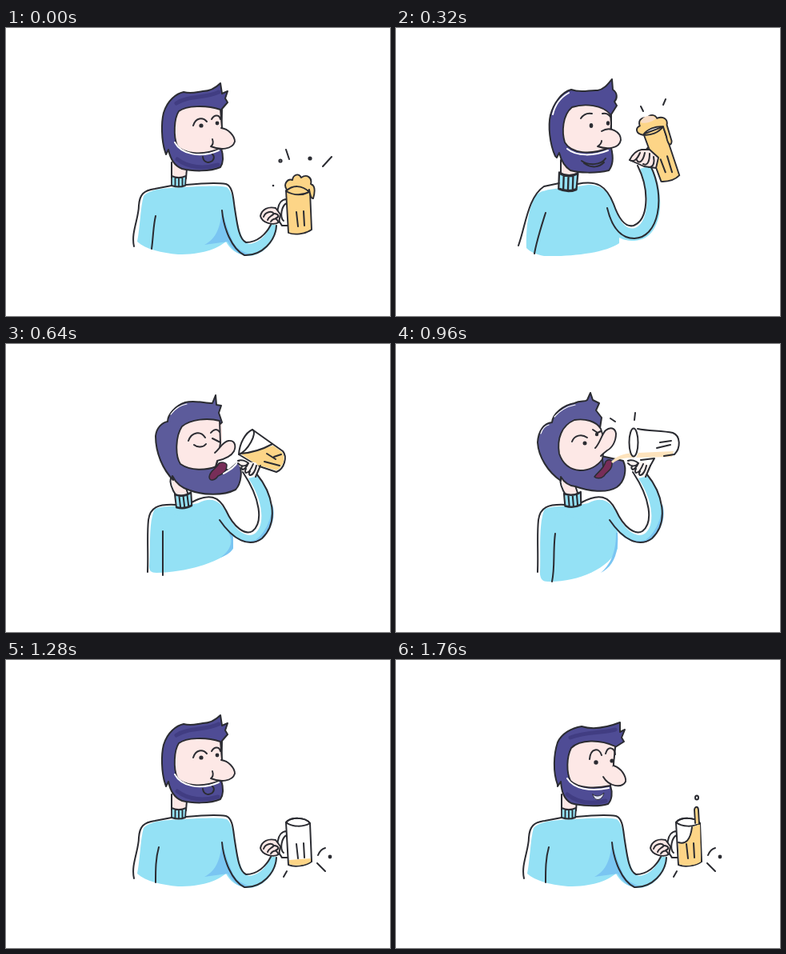
Animation, 480 px wide and 360 px high, one loop 1.92 s. Source, as an HTML page without scripts:

```html
<!DOCTYPE html>
<html lang="en">
<head>
<meta charset="utf-8">
<title>Cheers</title>
<style>
html, body { margin: 0; width: 100%; height: 100%; overflow: hidden; background: #fff; }
.stage { position: relative; width: 480px; height: 360px; overflow: hidden; }
.strip { display: block; width: 5760px; height: 360px; animation: flip 1.92s steps(12) -1ms infinite; }
@keyframes flip { to { transform: translateX(-5760px); } }
path, circle, ellipse { stroke-linecap: round; stroke-linejoin: round; }
.l { fill: none; stroke: #2b2c32; stroke-width: 2; }
.hair { fill: #4f4c95; stroke: #2b2c32; stroke-width: 2; }
.pale { fill: #5c5b9b; }
.dark { fill: none; stroke: #413d82; stroke-width: 5; }
.skin { fill: #fde8e6; stroke: #2b2c32; stroke-width: 1.9; }
.plain { fill: #fde8e6; }
.rim { fill: none; stroke: #fff; stroke-width: 2; }
.knit { fill: #94e1f5; }
.shade { fill: #7ac5f2; }
.beer { fill: #fdd587; }
.foam { fill: #fde3bd; }
.gold { fill: #fdd587; stroke: #2b2c32; stroke-width: 1.9; }
.glass { fill: #fff; stroke: #2b2c32; stroke-width: 2; }
.dot { fill: #2b2c32; }
.mouth { fill: #772d58; stroke: #2b2c32; stroke-width: 1.5; }
</style>
</head>
<body>
<div class="stage">
<svg class="strip" viewBox="0 0 5760 360">
<defs>
  <g id="collar">
    <path class="knit" d="M1 1Q10 4 19 1L19 12Q10 15 1 12Z"/>
    <path class="l" d="M0 0Q10 4 20 0M0 0L0 12Q10 15 19 12L20 0M5 2L5 12M10 3L10 13M15 2L15 12"/>
  </g>

  <!-- bodies -->
  <g id="bodyRest">
    <path class="plain" d="M207 165H226V190H207Z"/>
    <path class="l" d="M207 168V187M226 176L225 188"/>
    <path class="knit" d="M172 210C180 201 200 200 220 199C245 198 262 196 276 199C284 205 285 222 288 236C292 256 296 268 304 270C318 268 326 258 331 246L339 246C338 266 322 284 304 285C288 284 279 275 275 267C262 277 245 283 215 283C195 281 175 277 164 267C168 245 168 225 172 210Z"/>
    <path class="shade" d="M270 228C268 250 262 264 248 271L277 267C286 282 296 286 308 284C296 280 288 276 284 268C278 254 273 240 270 228Z"/>
    <path class="l" d="M160 273C156 256 166 238 166 222C167 208 172 203 186 201L207 197M225 196C245 194 264 193 275 195C284 198 284 214 286 226C289 245 291 264 300 268C314 268 325 258 331 246M270 228C272 250 282 276 298 284C320 285 337 266 338 247"/>
    <use href="#collar" transform="translate(207 185) scale(.9 1)"/>
  </g>
  <g id="bodyLift">
    <path class="plain" d="M205 160H227V186H204Z"/>
    <path class="l" d="M204 162V184M227 176V184"/>
    <path class="knit" d="M176 207C185 200 215 200 240 197C258 196 266 203 272 218C280 240 288 257 299 257C318 253 325 222 324 196L333 198C332 235 326 268 300 271C290 271 283 266 278 261C255 271 195 274 157 260C164 240 166 218 176 207Z"/>
    <path class="shade" d="M263 230C266 248 274 260 286 268L278 262C250 270 210 271 180 269C215 276 256 270 277 264C288 273 312 274 322 256C308 270 290 268 279 256C272 248 267 240 263 230Z"/>
    <path class="l" d="M157 257C161 230 170 206 187 199L205 198M228 194C252 189 263 197 271 216C280 240 289 253 298 253C316 249 322 222 320 194M264 230C270 252 284 271 299 271C323 268 332 236 331 198M182 235C178 248 177 260 175 272"/>
    <use href="#collar" transform="translate(204 184) scale(1.2 1)"/>
  </g>
  <g id="bodyHigh">
    <path class="plain" d="M206 162H227V186H206Z"/>
    <path class="l" d="M206 165V183M227 180V186"/>
    <path class="knit" d="M175 209C184 199 220 200 240 196C258 196 266 205 273 222C280 244 288 253 299 250C316 242 318 208 305 176L319 172C338 210 334 264 298 266C288 266 283 264 279 262V269C262 281 220 286 185 285C175 283 168 280 163 275C162 250 166 222 175 209Z"/>
    <path class="l" d="M153 272C162 247 165 211 185 198L204 194M227 195C251 190 263 197 272 220C280 243 289 249 297 247C315 240 318 204 302 172M264 225C270 250 282 263 298 263C328 262 338 212 318 172M187 231C181 250 176 265 173 282"/>
    <use href="#collar" transform="translate(204 181) rotate(2) scale(1.17 1.65)"/>
  </g>
  <g id="bodyDrink">
    <path class="plain" d="M206 168L224 176L229 190L213 194Z"/>
    <path class="l" d="M206 167C204 174 207 181 213 190M224 177L228 189"/>
    <path class="shade" d="M268 221C282 245 302 255 320 244C334 230 337 214 333 200C332 222 322 238 312 245C296 249 280 240 268 221Z"/>
    <path class="l" d="M177 285C178 260 176 240 178 220C180 204 190 200 212 201M232 198C254 186 266 190 275 208C285 230 299 239 308 234C322 223 318 193 296 160M267 220C284 245 304 255 320 243C342 222 333 186 313 162"/>
  </g>
  <path id="sleeve" class="knit" d="M186 206C200 201 220 204 240 199C258 190 268 196 277 213C287 235 302 243 311 237C325 226 321 195 303 168L314 165C334 186 340 222 320 244C305 253 288 246 277 234Z"/>

  <!-- heads -->
  <g id="headRest">
    <path class="hair" d="M199 155C194 140 194 118 197 106C202 90 213 82 222 80C232 83 238 80 246 79C256 79 262 75 268 69L270 82L277 79L274 88L277 93L270 101L269 150C272 160 272 168 268 174C255 180 232 179 220 176C210 172 205 162 203 152L200 158Z"/>
    <path class="dark" d="M266 80C250 88 228 84 213 94M214 164C228 175 248 176 265 171"/>
    <path class="skin" d="M268 102C250 96 225 97 216 104C210 113 209 135 214 147C222 157 245 160 267 151L270 125Z"/>
    <path class="rim" d="M211 143C219 158 243 163 266 153"/>
    <path class="skin" d="M269 125C278 126 286 135 286 142C283 152 268 153 256 148C259 146 259 142 258 139"/>
    <path class="l" d="M234 122C237 112 246 111 251 117M257 114C261 107 267 109 268 114M246 161C247 169 254 169 258 166C261 163 260 159 258 158"/>
    <circle class="dot" cx="244" cy="122" r="2.6"/><circle class="dot" cx="264" cy="119" r="2.4"/>
  </g>
  <g id="headLow">
    <path class="hair" d="M202 156C196 140 197 118 202 103C207 92 219 85 232 83C245 87 262 85 280 78L280 90L286 87L282 97L285 102L274 109L268 157C271 166 270 175 265 180C252 184 230 182 219 179C210 174 207 165 206 152L202 158Z"/>
    <path class="dark" d="M274 87C255 92 238 89 218 97M214 168C228 179 246 180 262 176"/>
    <path class="skin" d="M274 108C255 99 230 99 219 110C213 122 213 140 218 151C228 161 250 161 268 157L272 130Z"/>
    <path class="rim" d="M214 148C222 161 243 165 266 160"/>
    <path class="skin" d="M272 132C282 135 288 146 287 152C282 161 266 158 259 146"/>
    <path class="l" d="M242 124C243 110 254 109 257 119M262 117C265 107 273 109 274 118"/>
    <path d="M246 168C248 178 258 176 260 166C255 171 250 171 246 168Z" fill="#dfe2f6" stroke="#2b2c32"/>
    <circle class="dot" cx="250" cy="128" r="2.7"/><circle class="dot" cx="270" cy="126" r="2.6"/>
  </g>
  <g id="headUp">
    <path class="hair" d="M199 160C192 145 190 122 193 109C197 94 207 80 219 77C232 82 242 77 252 78C260 77 265 70 270 64L271 77C277 81 277 88 273 92L276 97L269 108L269 150C272 162 271 172 266 178C250 182 228 181 218 178C209 172 206 164 204 156L201 162Z"/>
    <path class="rim" d="M196 108C199 95 207 86 216 81"/>
    <path class="skin" d="M268 108C258 96 236 94 220 99C208 109 207 130 211 143C219 157 243 159 266 150L269 120Z"/>
    <path class="rim" d="M214 151C226 161 248 160 265 153"/>
    <path class="skin" d="M257 129C268 122 281 130 281 140C279 151 264 152 252 148C255 146 257 144 257 141"/>
    <path class="l" d="M231 113C235 107 240 106 245 107M258 107C262 106 266 108 268 111M232 166C240 172 256 172 262 163M235 169C245 176 254 174 260 168"/>
    <ellipse class="dot" cx="244" cy="122" rx="2.3" ry="3"/><ellipse class="dot" cx="265" cy="119" rx="2.2" ry="2.7"/>
  </g>
  <g id="headSip">
    <path class="hair pale" d="M196 158C190 143 188 120 192 106C198 91 215 83 232 79C244 76 256 79 268 65L271 78L269 85L275 90L271 98L275 104L266 112L267 150C274 158 275 171 270 180C258 185 238 184 225 181C211 177 203 168 199 154Z"/>
    <path class="rim" d="M194 108C198 97 205 90 214 86"/>
    <path class="skin" d="M266 108C254 92 232 92 223 102C216 115 215 130 220 142C229 152 250 153 265 148L267 125Z"/>
    <path class="skin" d="M257 132C268 130 280 123 284 132C285 141 274 151 258 147C263 145 264 142 265 140"/>
    <path class="l" d="M228 117C234 112 238 104 243 104L250 114M255 112L261 107L268 115M235 119C236 130 246 130 248 119M235 160C225 162 225 169 230 172C238 176 246 172 249 166"/>
    <circle class="dot" cx="264" cy="118" r="2.3"/>
  </g>
  <g id="headGulp">
    <path class="plain" d="M258 92L270 99L270 125L258 130Z"/>
    <path class="hair pale" d="M209 170C196 157 187 136 187 115C188 105 195 98 202 97C202 88 212 77 224 73C236 70 248 74 258 74L262 64L263 76L269 77L266 86L270 98L263 104L262 150L278 158L291 147C296 158 294 175 287 182C272 190 246 189 230 183C219 180 212 173 208 165Z"/>
    <path class="rim" d="M206 88C212 80 219 76 226 75" style="stroke-width:1.2"/>
    <path class="skin" d="M267 96C252 92 231 94 220 103C212 115 211 139 218 150C231 159 250 158 263 153L268 124Z"/>
    <path class="mouth" d="M254 166C255 157 265 155 266 149C270 147 275 148 276 151C276 160 271 162 265 165C261 171 254 172 254 166Z"/>
    <path class="rim" d="M272 162C279 158 286 154 290 147"/>
    <path class="skin" d="M261 136C268 130 271 122 278 121C286 120 288 127 285 134C281 141 273 144 264 146L262 153"/>
    <path class="l" d="M228 121C232 110 243 108 249 117M256 111C260 106 264 106 267 110M258 118L268 123M235 126C240 130 247 129 250 125"/>
  </g>
  <g id="headTip">
    <path class="hair pale" d="M206 171C190 160 178 141 177 123C178 108 185 99 195 98C196 87 210 76 223 74C231 70 236 73 239 70L243 61L246 70L254 74L250 83L257 92L255 105L252 139L284 146C289 157 286 172 276 179C263 187 241 184 224 178C214 177 209 171 206 166Z"/>
    <path class="rim" d="M198 91C206 82 214 78 224 76M181 112C183 106 187 102 191 101" style="stroke-width:1.2"/>
    <path class="skin" d="M256 106C250 96 236 93 223 95C207 102 201 118 204 137C208 149 217 157 230 158C243 158 252 152 258 144L261 122Z"/>
    <path class="mouth" d="M248 166C252 160 260 156 262 147C266 143 271 145 270 150C270 159 262 160 260 165C256 169 250 168 248 166Z"/>
    <path class="skin" d="M249 130C255 124 257 113 262 108C268 103 274 105 275 112C275 122 270 130 264 133C260 136 258 138 256 140" />
    <path class="l" d="M220 122C223 114 232 112 239 117M246 107L252 111L256 109M258 144L259 153"/>
    <circle class="dot" cx="236" cy="124" r="2.5"/><circle class="dot" cx="251" cy="113" r="2.2"/>
  </g>

  <!-- hands and mugs -->
  <g id="fist">
    <path class="skin" d="M318 235C320 226 328 223 337 225L343 233L341 243C334 247 320 244 318 235Z"/>
    <path class="l" d="M322 236C324 230 332 228 335 232C331 236 328 236 327 240M336 232C341 233 342 236 337 238M331 242C335 237 339 238 340 242"/>
  </g>
  <g id="grip">
    <path class="skin" d="M314 180C314 174 322 172 331 174L337 184L336 194L324 193Z"/>
    <path class="l" d="M314 181C318 177 325 177 328 181C324 184 322 188 325 193M329 180L336 190M326 187L333 194"/>
  </g>
  <g id="fingers">
    <path class="skin" d="M290 163C294 155 299 151 305 150L315 150L326 160L323 173L308 171Z"/>
    <path class="l" d="M290 163C295 166 299 163 303 154M299 163C302 169 307 164 309 154M307 168C313 171 315 163 315 155M314 172C321 172 321 164 320 159"/>
  </g>
  <g id="pinch">
    <path fill="#fff4f1" d="M290 147L312 148L318 156L312 166L303 164L291 152Z"/>
    <path class="l" d="M290 146C294 144 300 146 303 149C300 153 294 154 290 149M303 149C301 153 299 156 296 157C294 156 294 154 295 153M309 150C307 155 304 161 300 161C298 160 299 158 300 156M313 152C312 157 309 164 305 164C303 163 304 161 305 159M318 152L312 166"/>
  </g>
  <path id="handle" class="l" d="M351 214C338 214 336 236 345 247L353 247M351 219C344 222 342 237 347 241"/>
  <path id="ribs" class="l" d="M363 230L365 248M372 229L373 247"/>
  <path id="cup" d="M350 203C356 196 374 196 380 204L382 252C374 258 360 259 353 256Z"/>
  <path id="lip" class="l" d="M350 203C356 196 374 196 380 204C372 209 358 209 350 203Z"/>
  <g id="mugFull">
    <use href="#handle"/><use href="#cup" class="gold"/>
    <path class="gold" d="M351 202C346 195 352 188 358 190C359 183 366 181 369 187C376 182 383 187 381 195C387 197 386 206 384 213C381 214 380 207 379 202"/>
    <path class="l" d="M350 204C358 196 370 196 379 205C369 210 359 209 350 204Z"/><use href="#ribs"/>
  </g>
  <g id="mugEmpty">
    <use href="#handle"/><use href="#cup" class="glass"/>
    <path class="beer" d="M354 250L381 248L381 252C374 257 361 258 354 255Z"/>
    <use href="#lip"/><use href="#ribs"/>
  </g>
  <g id="mugLift">
    <path class="gold" d="M330 146L356 143L361 207C353 212 344 211 337 209Z"/>
    <path class="gold" d="M329 147C320 143 322 136 328 135C327 126 335 125 339 128C344 123 350 126 351 131C360 130 364 136 361 142L362 163C360 170 356 167 357 156L356 143C347 140 336 141 329 147Z"/>
    <path d="M330 131C333 124 345 123 350 131C344 134 336 135 330 131Z" fill="#f8dcc4"/>
    <path class="l" d="M330 147C338 150 349 149 356 143M343 182L345 199M352 180L353 201M331 164C324 168 326 174 330 175"/>
  </g>
  <g id="mugTilt">
    <path class="gold" d="M309 125C300 130 296 122 303 119C302 111 311 110 314 113C316 105 326 104 329 111"/>
    <path class="l" d="M308 133C299 140 300 157 316 160L323 151M311 139C305 145 309 154 315 152"/>
    <path class="gold" d="M307 123C312 114 322 108 332 112L356 153C354 161 341 168 331 165Z"/>
    <path class="l" d="M307 123C318 125 328 120 332 112M329 146L337 157M338 139L348 151"/>
  </g>
  <g id="arcSparks">
    <path class="l" d="M347 271L351 264M389 254L399 264M390 244C392 239 395 236 399 235"/>
    <circle class="dot" cx="405" cy="246" r="2.4"/>
  </g>
  <g id="liftSparks">
    <circle class="l" cx="311" cy="136" r="1.8"/><circle class="dot" cx="354" cy="117" r="2.6"/>
    <path class="l" d="M326 112L328 117M370 135L382 124"/>
  </g>
  <g id="restPose"><use href="#bodyRest"/><path class="l" d="M191 234C187 248 187 262 187 278"/></g>
  <g id="drinkLow">
    <path class="knit" d="M186 206L277 212L284 238V256C268 273 226 285 188 286C181 286 179 283 179 278C181 252 178 222 186 206Z"/>
    <path class="shade" d="M276 232C284 244 284 255 268 267C276 264 282 260 284 255V238Z"/>
    <use href="#sleeve"/><use href="#bodyDrink"/>
    <path class="l" d="M196 234C196 252 196 270 196 289"/>
    <use href="#collar" transform="translate(211 188) rotate(-7) scale(1.02 1.35)"/>
  </g>
  <g id="drinkHigh">
    <path class="knit" d="M186 206L275 212L277 236V256C266 281 226 298 190 297C183 297 181 294 180 288C181 260 178 222 186 206Z"/>
    <path class="shade" d="M275 236C275 254 272 272 256 286C270 279 279 264 277 236Z"/>
    <use href="#sleeve"/><use href="#bodyDrink"/>
    <path class="l" d="M199 237C196 260 199 278 195 297"/>
    <use href="#collar" transform="translate(210 187) rotate(-5) scale(1.05 1.3)"/>
  </g>
  <g id="mugTipped">
    <path fill="#fff" d="M300 106L346 110L354 124L347 139L299 142Z"/>
    <path class="foam" d="M303 136L347 134L345 141L300 142Z"/>
    <path class="l" d="M302 106C316 109 332 108 346 111C356 115 356 130 348 138L335 140"/>
    <ellipse class="glass" cx="297" cy="123" rx="5.5" ry="17.5"/>
    <path class="l" d="M330 123L344 121M326 130L343 126M306 145L323 143L318 152"/>
  </g>
  <path id="stream" class="foam" d="M269 147C279 137 289 137 298 136V142C286 142 278 143 271 149Z"/>
</defs>

<g>
  <use href="#bodyRest"/><path class="l" d="M187 235C184 248 184 262 182 276"/>
  <use href="#headRest"/><use href="#mugFull"/><use href="#fist"/>
  <circle class="l" cx="343" cy="166" r="1.6"/><circle class="dot" cx="380" cy="163" r="2.6"/>
  <circle class="dot" cx="334" cy="197" r="1.3"/>
  <path class="l" d="M350 152L354 164M396 173L407 161"/>
</g>
<g transform="translate(480)">
  <use href="#bodyLift"/><use href="#headUp"/><use href="#mugLift"/><use href="#grip"/><use href="#liftSparks"/>
</g>
<g transform="translate(960)">
  <use href="#bodyHigh"/><use href="#headUp"/>
  <use href="#mugLift" transform="translate(-14 -18) rotate(-14 345 175)"/>
  <use href="#fingers" transform="translate(2 2)"/>
  <path class="l" d="M306 98L309 104M334 96L337 89"/>
</g>
<g transform="translate(1440)">
  <use href="#bodyHigh"/><use href="#headSip"/><use href="#mugTilt"/><use href="#fingers"/>
  <path class="l" d="M305 96L309 102M334 102C335 98 336 96 338 94"/>
  <circle class="dot" cx="367" cy="149" r="2.5"/><circle class="dot" cx="346" cy="173" r="2.5"/>
</g>
<g transform="translate(1920)">
  <use href="#drinkLow"/><use href="#headGulp"/>
  <path class="glass" d="M308 107L346 134C352 141 348 156 338 160L314 152L291 138C292 124 299 111 308 107Z"/>
  <path class="beer" d="M293 137C306 134 322 131 334 127L345 135C350 142 347 154 338 158L314 151Z"/>
  <path class="l" d="M308 107C315 111 302 134 291 138M293 137C308 136 322 131 333 125M326 137L337 144M323 147L342 152M335 141L344 138"/>
  <use href="#pinch"/>
</g>
<g transform="translate(2400)">
  <use href="#drinkHigh"/><use href="#headTip" transform="translate(4 2) rotate(2 230 170)"/>
  <use href="#stream"/>
  <g transform="rotate(8 297 124)">
    <use href="#mugTipped"/>
    <path class="beer" d="M303 131L351 121C352 127 350 132 346 136L301 140Z"/>
    <path class="l" d="M326 130L343 126"/>
  </g>
  <use href="#pinch"/>
</g>
<g transform="translate(2880)">
  <use href="#drinkHigh"/><use href="#headTip"/>
  <use href="#stream"/><use href="#mugTipped"/><use href="#pinch"/>
  <path class="l" d="M268 93L274 97M299 86L298 95"/>
</g>
<g transform="translate(3360)">
  <use href="#bodyHigh"/><use href="#headUp" transform="translate(0 4)"/>
  <g transform="translate(-14 -18) rotate(-8 345 175)">
    <path class="glass" d="M330 146C337 139 350 138 356 143L361 207C353 212 344 211 337 209Z"/>
    <path class="beer" d="M337 203L360 201L360 207C352 211 344 210 338 208Z"/>
    <path class="l" d="M330 147C338 150 349 149 356 143M343 182L345 199M352 180L353 201M331 164C324 168 326 174 330 175"/>
  </g>
  <use href="#fingers" transform="translate(2 2)"/>
</g>
<g transform="translate(3840)">
  <use href="#restPose"/><use href="#headRest"/><use href="#mugEmpty"/><use href="#fist"/><use href="#arcSparks"/>
</g>
<g transform="translate(4320)">
  <use href="#restPose"/><use href="#headRest" transform="translate(1 2)"/><use href="#mugEmpty"/>
  <path class="beer" d="M354 240C362 236 372 243 381 238V252C374 257 361 258 354 255Z"/>
  <use href="#ribs"/><use href="#fist"/><use href="#arcSparks"/>
</g>
<g transform="translate(4800)">
  <use href="#restPose"/><use href="#headLow"/><use href="#mugEmpty"/>
  <path class="beer" d="M353 231C362 235 368 225 380 220L381 252C374 257 361 258 354 255Z"/>
  <path class="l" d="M353 231C362 235 368 225 380 220"/>
  <use href="#ribs"/><use href="#fist"/><use href="#arcSparks"/>
</g>
<g transform="translate(5280)">
  <use href="#restPose"/><use href="#headLow"/><use href="#mugEmpty"/>
  <path class="beer" d="M353 228C362 231 368 225 370 209L380 205L381 252C374 257 361 258 354 255Z"/>
  <path class="gold" d="M374 204L373 187C374 182 378 183 378 188L379 205"/>
  <path class="l" d="M353 228C362 231 368 225 370 209"/>
  <use href="#ribs"/><use href="#fist"/><use href="#arcSparks"/>
  <ellipse class="l" cx="376" cy="172" rx="2" ry="2.5"/>
</g>
</svg>
</div>
</body>
</html>
```
